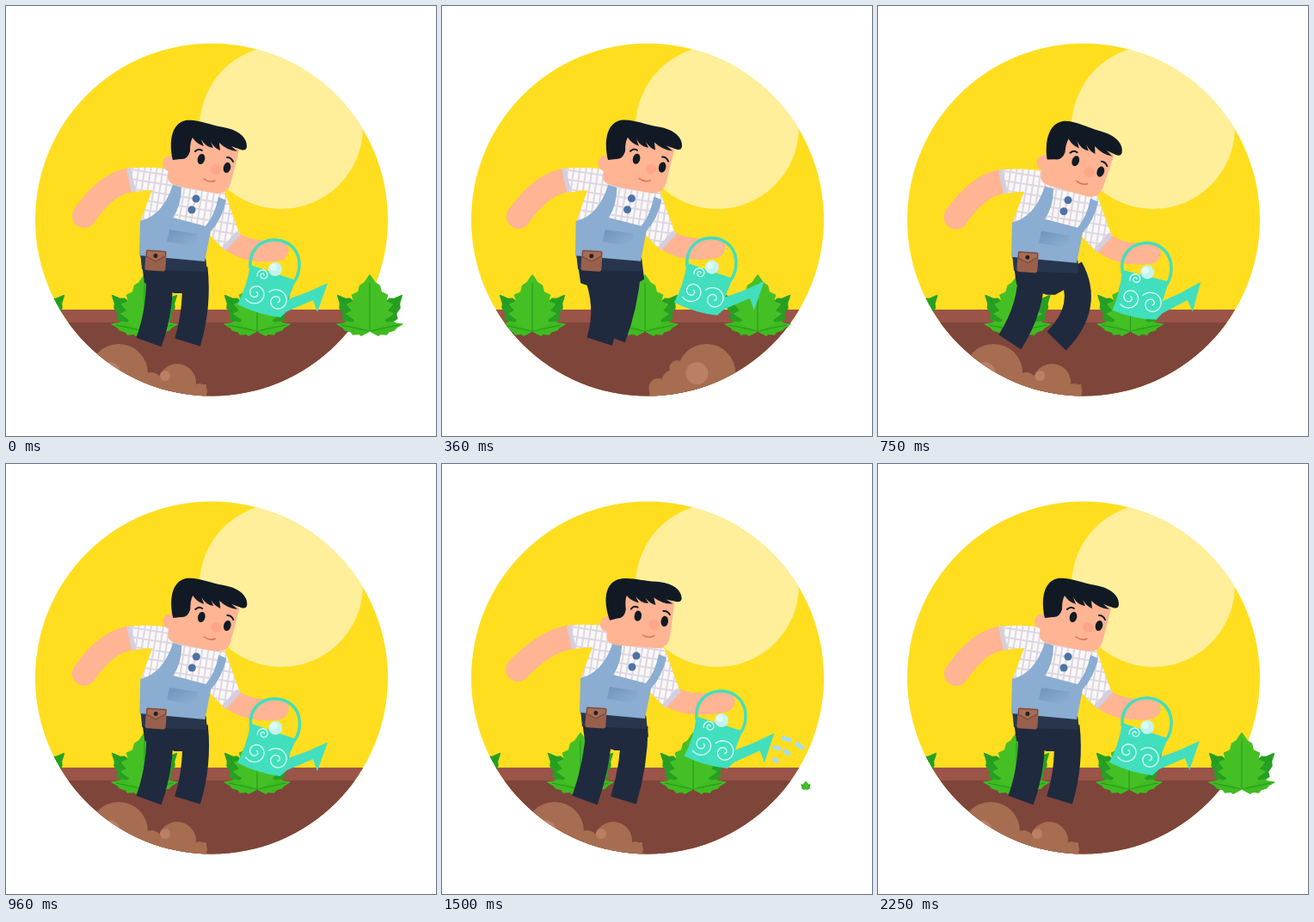
These frames come from a looping animation (500x500 px, 2.28 s). An HTML page:

```html
<!DOCTYPE html>
<html lang="en">
<head>
<meta charset="utf-8">
<title>Gardener</title>
<style>
html, body { margin: 0; width: 100%; height: 100%; overflow: hidden; background: #fff; }
svg { display: block; width: 100vw; height: 100vh; }
.line { fill: none; stroke-linecap: round; }
.skin { stroke: #ffb493; }
.leg { fill: none; stroke: #1f2a3f; stroke-width: 31; }
</style>
</head>
<body>
<svg viewBox="0 0 500 500">
  <defs>
    <clipPath id="disc"><circle cx="239" cy="248.500" r="205"/></clipPath>
    <clipPath id="openRight"><circle cx="239" cy="248.500" r="205"/><path d="M250 0H500V500H250z"/></clipPath>
    <pattern id="check" width="7" height="11" patternUnits="userSpaceOnUse" patternTransform="rotate(9)">
      <path fill="#ddd7e1" d="M0 0H7V11H0z"/><path fill="#faf7f8" d="M1 1H6V10H1z"/>
    </pattern>
    <linearGradient id="pocket" x2="1" y2="1">
      <stop stop-color="#6f93bd"/><stop offset="1" stop-color="#8fb1d4"/>
    </linearGradient>
    <g id="plant"></g>
    <g id="dust">
      <g fill="#a66d51">
        <circle cy="427" r="34"/><circle cx="-34" cy="421" r="9"/><circle cx="-38" cy="437" r="14"/>
        <circle cx="-56" cy="444" r="11"/><circle cx="38" cy="438" r="12"/>
        <circle cx="68" cy="438" r="22"/><circle cx="94" cy="448" r="9"/>
        <path d="M-66 440H102V460H-66z"/>
      </g>
      <g fill="#bb7f66"><circle cx="-11" cy="427" r="13"/><circle cx="54" cy="430" r="6"/></g>
    </g>
  </defs>

  <g clip-path="url(#disc)">
    <path fill="#ffde1f" d="M0 0H500V500H0z"/>
    <circle cx="320" cy="141" r="95" fill="#ffef9a"/>
    <path fill="#9a5448" d="M0 353H500V500H0z"/>
    <path fill="#7e453b" d="M0 368H500V500H0z"/>
  </g>
  <g clip-path="url(#openRight)" id="plants"></g>
  <g clip-path="url(#disc)"><g id="dusts"></g></g>

  <path class="leg" id="legR"/><path class="leg" id="legL"/>

  <g id="body">
    <path fill="#1f2a3f" d="M156 286L232 293 235 318 206 334H196L161 322z"/>
    <path fill="#28364d" d="M156 286L232 293 233 309 158 306z"/>
    <path class="line skin" id="armL" stroke-width="28"/>
    <path class="line skin" id="armR" stroke-width="25"/>
    <path fill="url(#check)" d="M141 189Q166 186 190 190L254 216Q263 242 272 266L255 284Q242 273 233 261L228 280 158 270V246L170 214 146 216z"/>
    <path fill="#d5cedd" d="M140 189L145 189 151 215 146 217zM268 262L273 266 255 285 251 281z"/>
    <path fill="#8aadd1" d="M155 290L156 250Q182 244 194 208L204 211Q204 232 194 246L232 256Q243 243 247 222L256 226Q251 248 238 262L231 297z"/>
    <path fill="url(#pocket)" d="M190 260L223 265 220 280 187 274z"/>
    <g fill="#4d72a6"><circle cx="221" cy="224" r="4.500"/><circle cx="216" cy="237" r="4.500"/></g>
    <g transform="rotate(4 174 296)">
      <rect x="162" y="284" width="24" height="24" rx="3" fill="#99604c"/>
      <path fill="#a66c54" stroke="#74463a" d="M163 285H185V290L174 297 163 292z"/>
      <circle cx="173.500" cy="290.500" r="2.500" fill="#2c1d20"/>
    </g>
    <g id="head">
      <circle cx="191" cy="183" r="9" fill="#ffb493"/>
      <path fill="#ffb493" d="M195 158L188 197Q187 206 199 209L244 218Q257 219 261 207L271 168 250 150 215 145z"/>
      <circle cx="244" cy="190" r="6" fill="#ffa68a"/>
      <path class="line" stroke="#dc7160" stroke-width="1.500" d="M230 201Q237 206 243 203"/>
      <path class="line" stroke="#111a24" stroke-width="2" d="M220 169Q224 165 228 168M257 176Q262 176 264 181"/>
      <g fill="#111a24">
        <ellipse class="eye" rx="4.200" transform="translate(227 178) rotate(14)"/>
        <ellipse class="eye" rx="4.200" transform="translate(257 188) rotate(14)"/>
        <path d="M194 179C190 163 190 137 209 133C222 131 236 138 253 141C270 144 281 153 280 164Q279 169 273 167L262 163 269 169Q257 168 248 159L249 168Q242 165 238 158L241 165Q232 164 227 155L230 163Q221 160 217 153Q214 158 214 169Q211 179 203 178z"/>
      </g>
    </g>
  </g>

  <g id="can">
    <path fill="#41dfbd" d="M284 301L337 319 328 341 350 333 374 322 362 356 357 342 327 355 319 362Q293 359 269 347Q280 327 284 301z"/>
    <path class="line" stroke="#41dfbd" stroke-width="3.500" d="M284 304C281 263 338 262 341 298Q342 311 335 321"/>
    <path class="line" id="swirls" stroke="#dcfff6" stroke-width="1.300"/>
    <circle cx="313" cy="306" r="8" fill="#c4f4ee"/>
    <circle cx="311" cy="304" r="4" fill="#dcfbf6"/>
  </g>
  <path class="line" id="water" stroke="#a5dcf3" stroke-width="5"/>
</svg>
<script>
const $ = id => document.getElementById(id);
const LOOP = 2280, WALK = 800, STRIDE = 900, SPACING = 131, DUST_GAP = 308;
const set = (el, name, value) => el.setAttribute(name, value);
const clamp = v => Math.max(0, Math.min(1, v));
const smooth = v => (v = clamp(v), v * v * (3 - 2 * v));
const ramp = (t, from, length) => smooth((t - from) / length);

function add(parent, tag, attributes) {
  const el = document.createElementNS("http://www.w3.org/2000/svg", tag);
  for (const name in attributes) set(el, name, attributes[name]);
  return $(parent).appendChild(el);
}

// Saw-toothed leaf that points up from the origin
function leafPath(length, half, teeth) {
  const right = [];
  const put = (s, k) => right.push([half * k * Math.sin(Math.PI * s ** .7), -length * s]);
  for (let i = 0; i < teeth; i++) {
    put((i + .15) / teeth, .85);
    put((i + .85) / teeth, 1.15);
  }
  const left = right.map(([x, y]) => [-x, y]).reverse();
  return "M0 0L" + [...right, [0, -length], ...left].join("L") + "z";
}

function leaf(angle, length, half, teeth, fill) {
  add("plant", "path", { d: leafPath(length, half, teeth), fill, transform: `rotate(${angle})` });
  add("plant", "path", { d: `M0 0V${-length * .85}`, stroke: "#1c9a1f", transform: `rotate(${angle})` });
}
for (const side of [-1, 1]) {
  leaf(side * 42, 57, 15, 5, "#269f22");
  leaf(side * 78, 40, 8, 4, "#3fbb20");
}
leaf(0, 66, 25, 6, "#45c024");

const plants = [0, 1, 2, 3].map(() => add("plants", "use", { href: "#plant" }));
for (const i of [0, 1]) add("dusts", "use", { href: "#dust", x: 131 + i * DUST_GAP });

function spiral(x, y, r, start, dir) {
  let d = "";
  for (let i = 0; i <= 40; i++) {
    const a = start + dir * i * .24, q = r * (1 - i / 46);
    d += `${i ? "L" : "M"}${x + q * Math.cos(a)} ${y + q * Math.sin(a)}`;
  }
  return d;
}
set($("swirls"), "d", spiral(290, 334, 13, 2.6, -1) + spiral(315, 343, 14, 4, 1) + spiral(299, 313, 7, 3, 1));

// Three parallel jets, each a row of drops on a quadratic curve
function jetPoint(j, p) {
  const a = (1 - p) ** 2, b = 2 * p * (1 - p), c = p * p;
  const x = a * (388 - 4 * j) + b * (432 - 17 * j) + c * (443 - 20 * j);
  const y = a * (317 + 12 * j) + b * (322 + 11 * j) + c * 377;
  return `${x} ${y}`;
}
function waterPath(t) {
  let d = "";
  for (let j = 0; j < 3; j++) for (let i = 0; i < 9; i++) {
    const p = (t - 1410 - i * 60 - j * 18) / 280;
    if (p >= 0 && p <= 1) d += `M${jetPoint(j, p)}L${jetPoint(j, Math.min(1, p + .09))}`;
  }
  return d;
}

function draw(t) {
  const walking = t < WALK, walk = ramp(t, 0, WALK);
  const phase = Math.PI * clamp(t / STRIDE);
  const swing = Math.sin(2 * phase), lift = Math.sin(phase) ** 2;
  const ease = 1 - ramp(t, 1850, 350);
  const lean = ramp(t, 900, 400) * ease, raise = ramp(t, 1200, 300) * ease;
  const dip = Math.sin(Math.PI * clamp((t - 900) / 500)) ** 2;

  // After the walk the last plant grows anew in the freed place
  const grown = ramp(t, 1400, 420) * (1 + .04 * Math.sin(Math.PI * clamp((t - 1700) / 400)));
  plants.forEach((el, i) => {
    const x = 30 + SPACING * (i - (walking ? walk : 0));
    set(el, "transform", `translate(${x} 378) scale(${i === 3 && !walking ? grown : 1})`);
  });
  set($("dusts"), "transform", `translate(${-walk * DUST_GAP})`);

  const dx = 5 * lean, dy = 2 * Math.max(0, -swing) - raise;
  set($("body"), "transform", `translate(${dx} ${dy}) rotate(${-.8 * Math.max(0, swing)} 195 295)`);
  set($("head"), "transform", `rotate(${3 * lift - 4.5 * swing - 7 * raise} 222 212)`);
  const eyeHeight = Math.abs(t - 1170) < 75 ? .6 : 6.2;
  document.querySelectorAll(".eye").forEach(eye => set(eye, "ry", eyeHeight));

  set($("legL"), "d", `M${178 + dx} 305Q${181 + 14 * lift + 5 * swing} 349
    ${166 + 17 * swing + 8 * lift} ${391 - lift}`);
  set($("legR"), "d", `M${219 - 5 * swing + dx} 305Q${224 - 26 * swing + 4 * lift} 349
    ${211 - 14 * lift} ${391 - 6 * lift}`);

  const canX = lift + 5 * lean + 7 * raise, canY = 6 * dip - 4 * swing - 8 * raise;
  const tilt = 5 * Math.min(0, swing) + 4 * dip - raise;
  set($("can"), "transform", `translate(${canX} ${canY}) rotate(${tilt} 313 306)`);
  const x = canX - dx, y = canY - dy;
  set($("armR"), "d", `M258 270Q${280 + x / 2} ${289 + y / 2} ${316 + x} ${284 + y}`);
  set($("armL"), "d", `M148 202Q118 204 ${91 - 2 * lift - 8 * lean} ${244 - 4 * lean}`);
  set($("water"), "d", waterPath(t));
}

const began = performance.now();
function tick() {
  draw((performance.now() - began) % LOOP);
  requestAnimationFrame(tick);
}
tick();
</script>
</body>
</html>
```
